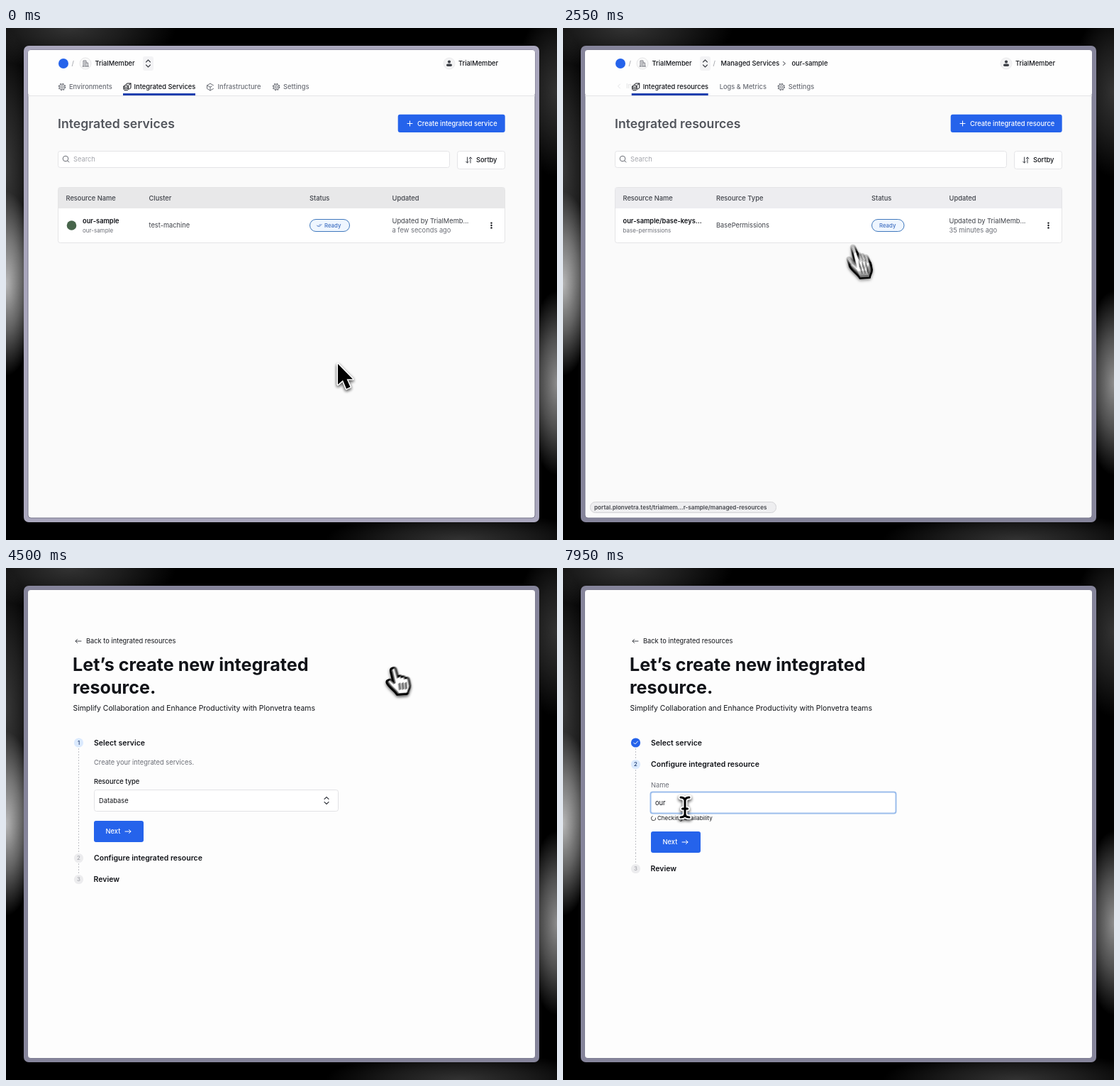
These frames come from a looping animation (777x721 px, 8 s). An HTML page:

```html
<!DOCTYPE html>
<html lang="en">
<head>
<meta charset="utf-8">
<style>
html, body { margin: 0; width: 100%; height: 100%; overflow: hidden; background: #000; }
svg { display: block; font-family: Inter, "Open Sans", sans-serif; }
.line { fill: none; stroke: currentColor; stroke-linecap: round; stroke-linejoin: round; }
.cursor { filter: drop-shadow(0 2px 2px rgba(0, 0, 0, .4)); }
</style>
</head>
<body>
<svg id="stage" width="777" height="721" viewBox="0 0 777 721"></svg>
<script>
const stage = document.getElementById('stage');
const BLUE = '#2563eb', HOVER = '#3b82f6', INK = '#111318', DARK = '#3f4249', GRAY = '#6b6e76', PALE = '#a4a6ac';
const ACCOUNT = 'TrialMember', SERVICE = 'our-sample', TYPED = 'our';

// Markup helpers; text is placed by its vertical centre.
const text = (x, y, str, { size = 9.3, weight = 500, fill = DARK, more = '' } = {}) =>
  `<text x="${x}" y="${y + size * .36}" font-size="${size}" font-weight="${weight}" fill="${fill}" ${more}>${str}</text>`;
const box = (x, y, w, h, fill, stroke = 'none', r = 3, more = '') =>
  `<rect x="${x}" y="${y}" width="${w}" height="${h}" rx="${r}" fill="${fill}" stroke="${stroke}" ${more}/>`;
const dot = (x, y, r, fill, stroke = 'none') => `<circle cx="${x}" cy="${y}" r="${r}" fill="${fill}" stroke="${stroke}"/>`;
const line = (x, y, d, color = GRAY, width = 1) =>
  `<path class="line" transform="translate(${x} ${y})" color="${color}" stroke-width="${width}" d="${d}"/>`;
const group = (id, content, more = '') => `<g id="${id}" ${more}>${content}</g>`;
const glow = (x, y, rx, ry, opacity) =>
  `<ellipse cx="${x}" cy="${y}" rx="${rx}" ry="${ry}" fill="url(#glow)" opacity="${opacity}"/>`;

const gear = (x, y) => dot(x, y, 1.7, 'none', GRAY) + dot(x, y, 3.8, 'none', GRAY) +
  `<circle cx="${x}" cy="${y}" r="4.7" fill="none" stroke="${GRAY}" stroke-width="1.2" stroke-dasharray="1.85"/>`;
const database = (x, y) => line(x, y,
  'M-5-1a3.2 1.4 0 0 1 6.4 0a3.2 1.4 0 0 1-6.4 0V3.4a3.2 1.4 0 0 0 6.4 0V-1M-5 1.3a3.2 1.4 0 0 0 6.4 0M-2-3.6L0-5H5V1.5L2.5 3M2-2.5L5-5', INK);
const cube = (x, y) => line(x, y, 'M4.5-2.2L0-4.8L-4.5-2.2V2.4L0 5L4.5 2.4M-4.5-2.2L0 .2L2.3-1M0 .2V5');
const updown = (x, y) => line(x, y, 'M-3-2L0-5L3-2M-3 2L0 5L3 2', DARK, 1.1);
const arrowRight = (x, y) => line(x, y, 'M-4 0H4M1.5-2.5L4 0L1.5 2.5', '#fff');
const underline = (x, w) => `<rect x="${x}" y="92" width="${w}" height="3" fill="#1e40af"/>`;

function createButton(id, x, label) {
  return box(x - .3, 121.7, 704 - x, 25.4, BLUE, 'none', 3, `id="${id}"`) +
    line(x + 16.5, 134.5, 'M-3.5 0H3.5M0-3.5V3.5', '#fff') + text(x + 27, 134.5, label, { fill: '#fff' });
}

function topBar() {
  return box(31, 31, 715, 64, '#fefefe', 'none', 4) + box(31, 95, 715, 1, '#e4e4e6', 'none', 0) +
    dot(81, 50, 7, BLUE) + text(92.5, 50, '/', { fill: PALE }) +
    dot(112, 50, 8, '#fafafa', '#e6e6e8') + line(112, 50, 'M-4 4H4.5M-3 4V-4H1V4M1-1H3.5V4M-1.5-2H-.5M-1.5 0H-.5M-1.5 2H-.5', GRAY, .9) +
    text(125.5, 50, ACCOUNT, { fill: INK }) + box(193, 40, 15, 20, '#f3f3f5') + updown(200.5, 50) +
    dot(625, 50, 8, '#f3f3f4', '#ececee') + dot(625, 47.6, 2.1, DARK) + box(621, 50.5, 8, 3.6, DARK, 'none', 1.8) +
    text(638, 50, ACCOUNT, { fill: INK });
}

function listPage({ title, columns, statusX, statusW, ready, row, updated, button }) {
  const head = [['Resource Name', 84.5], columns, ['Status', statusX], ['Updated', 544.5]];
  return text(73, 134.5, title, { size: 17.65, weight: 600, fill: '#52555c' }) + button +
    box(73.5, 173.5, 552, 23, '#fff', '#e4e4e6') + dot(84, 184, 3.8, 'none', GRAY) + line(84, 184, 'M3 3L5 5') +
    text(95, 185, 'Search', { weight: 400, fill: PALE }) +
    box(636.5, 173.5, 67, 25, '#fff', '#e4e4e6') +
    line(652.5, 186, 'M-2-4V4M-4 2L-2 4L0 2M2.5 4V-4M.5-2L2.5-4L4.5-2', DARK) + text(663, 186, 'Sortby', { fill: INK }) +
    box(73.5, 224.5, 630, 78, '#fff', '#e4e4e6') +
    `<rect class="thead" x="74" y="225" width="629" height="29"/>` +
    head.map(([label, x]) => text(x, 240, label)).join('') + row +
    box(statusX + .5, 269.5, statusW, 17, '#eff6ff', '#3f78bd', 8.5) + ready +
    text(544.5, 271.5, `Updated by ${ACCOUNT.slice(0, 9)}...`, { weight: 400 }) +
    text(544.5, 285, updated, { weight: 400, fill: GRAY }) +
    [-3.4, 0, 3.4].map(dy => dot(684.5, 278 + dy, 1.2, INK)).join('');
}

const statusChip = (id, w, label) => group(id,
  box(38.5, 667.5, w, 15, '#eeeef0', '#d3d3d6', 7) + text(44, 675, label, { size: 8.15, weight: 600, fill: '#44464c' }));

const servicesPage = topBar() +
  gear(79, 83) + text(89, 83, 'Environments', { fill: GRAY }) +
  database(171, 83) + text(180.5, 83, 'Integrated Services', { fill: INK }) + underline(165, 102) +
  cube(288, 83) + text(298.5, 83, 'Infrastructure', { fill: GRAY }) +
  gear(381, 83) + text(391, 83, 'Settings', { fill: GRAY }) +
  listPage({
    title: 'Integrated services', columns: ['Cluster', 201.5], statusX: 428, statusW: 56,
    ready: line(442, 278, 'M-2 .5L-.5 2L3-1.5M-3.5 0L-2 1.5M-.5 0L1-1.5', '#3f6fc0', .9) + text(449, 278, 'Ready', { size: 7.8, fill: '#3f6fc0' }),
    row: dot(92.5, 278, 6.8, '#47654b') + text(108, 272, SERVICE, { weight: 600, fill: INK }) +
      text(108, 285, SERVICE, { size: 8, weight: 400, fill: GRAY }) + text(201.5, 278, 'test-machine', { weight: 400 }),
    updated: 'a few seconds ago', button: createButton('serviceButton', 553, 'Create integrated service')
  }) + statusChip('chipCreate', 231, 'portal.plonvetra.test/trialmember/new-service');

const resourcesPage = topBar() + text(211.5, 50, '/', { fill: PALE }) +
  text(222.5, 50, 'Managed Services', { fill: INK }) + line(312, 50, 'M-1.5-2.5L1.5 0L-1.5 2.5', DARK) +
  text(322.5, 50, SERVICE, { fill: INK }) +
  group('backLink', line(79, 82, 'M1.5-3L-1.5 0L1.5 3') + text(89, 82, 'Integrated Services', { fill: GRAY }) +
    box(192, 77, 1, 11, '#ededef', 'none', 0)) +
  group('tabs', box(202, 75, 270, 18, '#fefefe', 'none', 0) + database(208, 83) +
    text(218, 83, 'Integrated resources', { fill: INK }) + underline(202, 108) +
    text(326, 83, 'Logs &amp; Metrics', { fill: GRAY }) + gear(413, 83) + text(423, 83, 'Settings', { fill: GRAY })) +
  listPage({
    title: 'Integrated resources', columns: ['Resource Type', 216], statusX: 435, statusW: 45.5,
    ready: text(446, 278, 'Ready', { size: 7.8, fill: '#3f6fc0' }),
    row: text(84.5, 272, `${SERVICE}/base-keys...`, { weight: 600, fill: INK }) +
      text(84.5, 285, 'base-permissions', { size: 8, weight: 400, fill: GRAY }) + text(216, 278, 'BasePermissions', { weight: 400 }),
    updated: '35 minutes ago', button: createButton('resourceButton', 547, 'Create integrated resource')
  }) + statusChip('chipRow', 262, 'portal.plonvetra.test/trialmem...r-sample/managed-resources');

function step(number, y, label, state) {
  const [fill, ink] = { active: ['#dbeafe', '#1e3a6e'], idle: ['#ececee', PALE], done: [BLUE, '#fff'] }[state];
  const mark = state === 'done' ? line(102.5, y, 'M-2.8 0L-.8 2L3-2', '#fff')
    : text(102.5, y, number, { size: 7.8, fill: ink, more: 'text-anchor="middle"' });
  return dot(102.5, y, 6.6, fill) + mark + text(number === 3 ? 123.5 : 124, y, label, { size: 10.5, weight: 600, fill: INK });
}
const dashes = (from, to) => `<path d="M102.5 ${from}V${to}" stroke="#bfc1c6" stroke-dasharray="2 2"/>`;
const nextButton = y => box(124, y, 70, 30, BLUE) + text(140.5, y + 15, 'Next', { fill: '#fff' }) + arrowRight(172, y + 15);
const heading = { size: 25.1, weight: 700, fill: INK };

const formPage = box(31, 31, 715, 659, '#fdfdfd', 'none', 4) +
  line(102, 103, 'M4 0H-4M-1.5-2.5L-4 0L-1.5 2.5', DARK) + text(113, 103, 'Back to integrated resources', { weight: 400, fill: INK }) +
  text(94, 135.5, 'Let’s create new integrated', heading) + text(94, 167.5, 'resource.', heading) +
  text(94.5, 197.5, 'Simplify Collaboration and Enhance Productivity with Plonvetra teams', { size: 10.4, weight: 400, fill: INK }) +
  group('stepSelect', dashes(254, 401) + dashes(416, 431) +
    step(1, 246, 'Select service', 'active') + text(124, 274, 'Create your integrated services.', { weight: 400, fill: GRAY }) +
    text(124, 300.5, 'Resource type', { fill: INK }) + box(124.5, 312.5, 344, 30, '#fff', '#e2e2e5') +
    text(131, 327.5, 'Database', { weight: 400, fill: INK }) + updown(452, 327.5) + nextButton(356) +
    step(2, 408.5, 'Configure integrated resource', 'idle') + step(3, 438.5, 'Review', 'idle')) +
  group('stepName', dashes(254, 269) + dashes(284, 402) +
    step(1, 246, 'Select service', 'done') + step(2, 276.5, 'Configure integrated resource', 'active') +
    text(124, 306, 'Name', { weight: 400, fill: GRAY }) +
    box(123.5, 315.5, 346, 30, '#fff', '#c3cae2', 3, 'id="field" stroke-width="2"') +
    text(130, 330.5, 'Enter integrated service name', { weight: 400, fill: PALE, more: 'id="placeholder"' }) +
    text(130, 330.5, '', { weight: 400, fill: INK, more: 'id="typed"' }) +
    box(130, 324, 1, 12, INK, 'none', 0, 'id="caret"') +
    group('checking', group('spinner', '<circle r="3" fill="none" stroke="#555" stroke-dasharray="14 5"/>') +
      text(133, 352.5, 'Checking availability', { size: 8, weight: 400, fill: INK })) +
    group('lower', dashes(388, 402) + nextButton(358) + step(3, 410.5, 'Review', 'idle')));

const beam = 'M-6-14Q0-14 0-9V9Q0 14-6 14M6-14Q0-14 0-9M0 9Q0 14 6 14M-3.5 2H3.5';
const defs = `<defs>
  <radialGradient id="glow"><stop stop-color="#fff"/><stop offset=".5" stop-color="#fff" stop-opacity=".55"/>
    <stop offset="1" stop-color="#fff" stop-opacity="0"/></radialGradient>
  <path id="arrow" d="M0 0V29L7 23L12 35L17.5 32.5L12.5 21.5H21Z" fill="#000" stroke="#fff" stroke-width="3" paint-order="stroke" stroke-linejoin="round"/>
  <g id="hand" stroke="#000" stroke-linecap="round" stroke-linejoin="round">
    <path d="M-2 3C-3-2 3-3 4 1L7 12C8 9 11 9 12 12C13 10 16.500 10.500 17 13.500C19 12 22 12.500 22.500 16L24 24C24 29 21 31 21 35L7 36C5 31-3 27-7 20C-9 16-5 14-2 16.500L2 20Z" fill="#fff" stroke-width="2.5"/>
    <path d="M9 21L10 29M13.500 20.500L14.300 28.500M18 20L18.500 28" stroke-width="1.8"/></g>
  <g id="beam" fill="none" stroke-linecap="round"><path d="${beam}" stroke="#fff" stroke-width="6.5"/><path d="${beam}" stroke="#000" stroke-width="3"/></g>
</defs>`;

const backdrop = glow(0, 360, 45, 130, .7) + glow(0, 200, 45, 200, .22) + glow(90, 0, 150, 60, .2) +
  glow(777, 500, 45, 130, .55) + glow(777, 90, 60, 120, .2) + glow(640, 721, 190, 40, .2);

const SAMPLES = 5;
stage.innerHTML = defs + backdrop +
  box(25, 25, 727, 671, '#86859b', 'none', 7, 'id="bezel"') + box(31, 31, 715, 659, '#fafafa', '#77768a', 4) +
  group('services', servicesPage) + group('resources', resourcesPage) + group('form', formPage) +
  Array.from({ length: SAMPLES }, (_, i) => `<g opacity="${1 / (i + 1)}"><use class="cursor"/></g>`).join('');

const el = id => document.getElementById(id);
const cursors = [...stage.querySelectorAll('.cursor')];
const heads = [...stage.querySelectorAll('.thead')];
const show = (id, on) => { el(id).style.display = on ? '' : 'none'; };
const ramp = (t, from, to) => Math.min(1, Math.max(0, (t - from) / (to - from)));
const ease = p => p < .5 ? 2 * p * p : 1 - 2 * (1 - p) ** 2;

// Each move: start, end, x, y.
const moves = [
  [0, 1, 468, 473], [900, 1800, 611, 145], [1950, 2350, 398, 282], [2420, 2700, 425, 350],
  [3650, 3950, 549, 140], [4450, 5200, 192, 337], [5500, 5750, 160, 368], [5950, 6190, 178, 350], [6350, 6650, 172, 337]
];
const shapes = [[0, 'arrow'], [1880, 'hand'], [2060, 'arrow'], [2280, 'hand'], [2760, 'arrow'],
  [3850, 'hand'], [4520, 'arrow'], [5120, 'hand'], [6080, 'beam']];

function cursorAt(t) {
  let [, , x, y] = moves[0];
  for (const [from, to, toX, toY] of moves) {
    const p = ease(ramp(t, from, to));
    x += (toX - x) * p;
    y += (toY - y) * p;
  }
  return [x, y];
}

function draw(t) {
  show('services', t < 2450);
  show('resources', t >= 2450 && t < 4350);
  show('form', t >= 4350);
  const early = t < 1200;
  el('bezel').setAttribute('fill', early ? '#aaa7bd' : '#86859b');
  heads.forEach(h => h.setAttribute('fill', early ? '#e8e8e9' : '#ededf0'));

  el('serviceButton').setAttribute('fill', t > 1740 && t < 2020 ? HOVER : BLUE);
  el('resourceButton').setAttribute('fill', t > 3850 ? HOVER : BLUE);
  el('chipCreate').style.opacity = ramp(t, 1770, 1950) * (1 - ramp(t, 2010, 2150));
  el('chipRow').style.opacity = 1 - ramp(t, 2750, 2950);

  const slide = ease(ramp(t, 2460, 2760));
  el('tabs').setAttribute('transform', `translate(${129 * (slide - 1)} 0)`);
  el('backLink').style.opacity = slide;

  show('stepSelect', t < 5950);
  show('stepName', t >= 5950);
  const count = [7350, 7550, 7750].filter(at => t >= at).length;
  el('typed').textContent = TYPED.slice(0, count);
  show('placeholder', !count);
  show('checking', count);
  show('caret', t >= 6100 && !count && (t - 6150) % 1000 < 500);
  el('field').setAttribute('stroke', t < 6300 ? '#c3cae2' : '#9bbdec');
  el('spinner').setAttribute('transform', `translate(127.500 352.500) rotate(${t * .36})`);
  el('lower').setAttribute('transform', `translate(0 ${count ? 13 : 0})`);

  // Motion blur: average poses around t; a new cursor shape grows in.
  const [since, shape] = shapes.filter(([at]) => t >= at).pop();
  const scale = since ? .75 + .25 * ramp(t, since, since + 120) : 1;
  cursors.forEach((cursor, i) => {
    const [x, y] = cursorAt(t + (2 - i) * 5);
    cursor.setAttribute('href', '#' + shape);
    cursor.setAttribute('transform', `translate(${x} ${y}) scale(${scale})`);
  });
}

function tick() {
  draw(performance.now() % 8000);
  requestAnimationFrame(tick);
}
tick();
</script>
</body>
</html>
```
